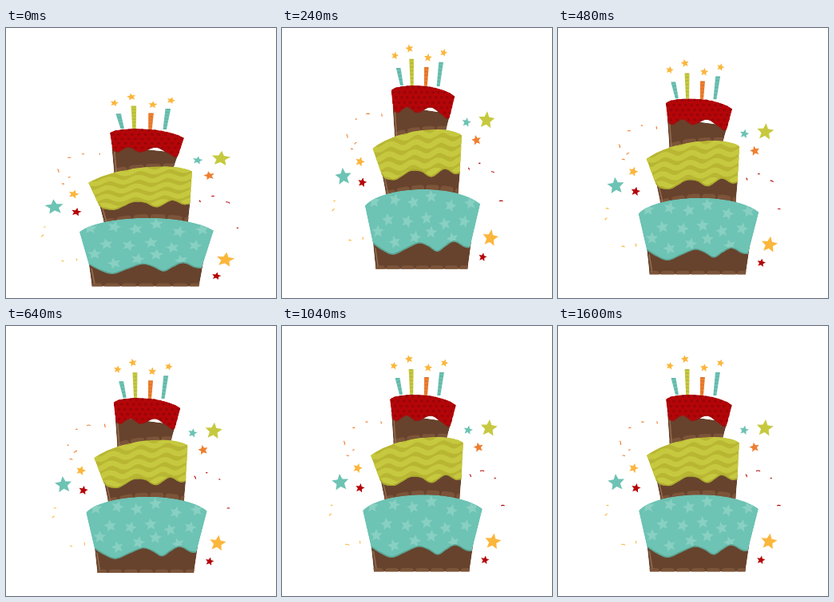
Recreate the animation shown at these times as an HTML page. Size 338x338 px, loop 1.92 s.

```html
<!DOCTYPE html>
<html lang="en">
<head>
<meta charset="utf-8">
<title>Birthday cake</title>
<style>
html, body { margin: 0; width: 100%; height: 100%; overflow: hidden; background: #fff; }
svg { display: block; width: 100vw; height: 100vh; }
</style>
</head>
<body>
<svg viewBox="0 0 338 338"><defs id="defs"></defs><g id="cake"></g></svg>
<script>
const NS = 'http://www.w3.org/2000/svg';
const cake = document.getElementById('cake');
const defs = document.getElementById('defs');

const TEAL = '#6dc3b4', LIME = '#c6c93f', ORANGE = '#ee7f30';
const GOLD = '#fbb63c', RED = '#b40508', BROWN = '#67432d', COCOA = '#7c5439';

function add(parent, tag, attrs) {
  const el = document.createElementNS(NS, tag);
  for (const k in attrs) el.setAttribute(k, attrs[k]);
  parent.appendChild(el);
  return el;
}

const path = (parent, d, fill, more) => add(parent, 'path', { d, fill, ...more });
const line = (parent, d, stroke, width, more) =>
  path(parent, d, 'none', { stroke, 'stroke-width': width, ...more });

function star(parent, x, y, r, fill, turn = 0) {
  let pts = '';
  for (let i = 0; i < 10; i++) {
    const a = turn + i * Math.PI / 5 - Math.PI / 2;
    const q = i % 2 ? r * 0.46 : r;
    pts += `${(x + q * Math.cos(a)).toFixed(2)},${(y + q * Math.sin(a)).toFixed(2)} `;
  }
  add(parent, 'polygon', { points: pts, fill });
}

// Smooth curve through points, continuing from the first one.
function curve(p) {
  let d = '';
  for (let i = 0; i < p.length - 1; i++) {
    const a = p[i - 1] || p[i], b = p[i], c = p[i + 1], e = p[i + 2] || c;
    d += `C${b[0] + (c[0] - a[0]) / 6},${b[1] + (c[1] - a[1]) / 6} ` +
         `${c[0] - (e[0] - b[0]) / 6},${c[1] - (e[1] - b[1]) / 6} ${c[0]},${c[1]}`;
  }
  return d;
}

function clipped(id, d) {
  path(add(defs, 'clipPath', { id }), d);
  return add(cake, 'g', { 'clip-path': `url(#${id})` });
}

function tier({ id, sponge, base, edge, top, drip, fill, rim, pattern }) {
  const body = clipped(id + 'Sponge', sponge);
  path(body, sponge, BROWN);
  line(body, base, COCOA, 8, { 'stroke-dasharray': '9 10', 'stroke-linecap': 'round' });
  line(body, edge, '#936a4d', 1.6);
  const start = drip[0];
  const icing = `${top}L${start}${curve(drip)}Z`;
  const g = clipped(id + 'Icing', icing);
  path(g, icing, fill);
  pattern(g);
  line(g, `M${start}${curve(drip)}`, rim, 3);
}

tier({
  id: 'red', fill: RED, rim: '#9c1410',
  sponge: 'M137,110L212,120L206,141L203,152H140Z',
  base: 'M142,146Q165,138 207,139',
  edge: 'M140,118L142.5,150',
  top: 'M135,92C140,84 195,82 218,99',
  drip: [[211, 125], [207, 126], [199, 120], [186, 112.5], [169, 119], [156, 112.5], [144, 119], [138, 116]],
  pattern(g) {
    for (let j = 0; j < 7; j++)
      for (let i = 0; i < 13; i++)
        add(g, 'circle', { cx: 134 + i * 7.4 + (j % 2) * 3.7, cy: 88 + j * 6.2, r: 1.8, fill: '#980609' });
  }
});

tier({
  id: 'lime', fill: '#b8b632', rim: '#aaa62f',
  sponge: 'M122,186H225L222,220H129Z',
  base: 'M128,218Q175,204 222,214',
  edge: 'M126.5,196L131.5,218',
  top: 'M111,162C140,140 205,132 227,146',
  drip: [[224.5, 192], [217, 192.5], [204, 187], [188, 196.5], [174, 190], [161, 189], [150, 195], [140, 200], [128, 198.5], [122.5, 193]],
  pattern(g) {
    for (let j = 0; j < 6; j++) {
      const pts = [];
      for (let x = 105; x <= 235; x += 5)
        pts.push([x, 145 + j * 12 - (x - 170) * 0.07 + 3 * Math.sin((x - 112 + j * 2) / 5.2)]);
      line(g, `M${pts[0]}${curve(pts)}`, LIME, 6.6);
    }
  }
});

tier({
  id: 'teal', fill: TEAL, rim: '#5ca18f',
  sponge: 'M111,270H240L234.5,307.5H115Z',
  base: 'M114,307H236',
  edge: 'M114.5,282L118,304',
  top: 'M101,231C125,206 220,204 251,229',
  drip: [[237.5, 282], [230, 281], [217, 274.5], [206, 280], [195, 286.5], [183, 280], [171, 276.5], [155, 283], [138, 290], [124, 285], [111.5, 277]],
  pattern(g) {
    [[113, 226], [140, 224], [164, 227], [187, 220], [212, 231], [238, 228],
     [131, 248], [156, 250], [181, 246], [205, 253], [230, 250],
     [118, 262], [140, 275], [166, 269], [187, 263], [215, 271]]
      .forEach(([x, y], i) => star(g, x, y, 8.2, '#87d0c2', 0.3 * Math.sin(i * 2)));
  }
});

// Candles: top centre, base centre, colour.
[[144.5, 65, 149, 86, TEAL], [161.6, 54, 162.2, 86, LIME],
 [181, 64, 180, 87, ORANGE], [200, 58, 196.3, 87, TEAL]].forEach(([x, y, bx, by, c]) => {
  path(cake, `M${x - 3},${y}L${x + 3},${y}L${bx + 2},${by}L${bx - 2},${by}Z`, c);
  line(cake, `M${x},${y}L${bx},${by}`, '#00000018', 4, { 'stroke-dasharray': '1.5 3' });
});

[[140, 50, 5, GOLD, 0.2], [159, 41.5, 5.3, GOLD, -0.2], [183, 52.5, 5.3, GOLD, 0.1], [203.3, 46.5, 5, GOLD, 0.3],
 [73, 196, 11, TEAL, -0.1], [97.6, 203, 6, RED, 0.2], [94.6, 178, 6.3, GOLD, 0.3],
 [259, 128, 11, LIME, 0.1], [233, 130.5, 6, TEAL, 0.2], [246, 152, 6.4, ORANGE, -0.2],
 [264, 270, 10.6, GOLD, 0.15], [254, 293, 5.5, RED, 0.2]].forEach(a => star(cake, ...a));

// Slivers of ribbon: x, y, colour, direction in degrees.
const slivers = [[90, 127, ORANGE, 0], [105, 121, ORANGE, 0], [123, 122, ORANGE, 80], [78, 146, ORANGE, 75],
  [89, 155, ORANGE, -35], [83, 163, ORANGE, 10], [62, 225, GOLD, 0], [60, 237, GOLD, -45],
  [82, 273, GOLD, 10], [98, 270, GOLD, 80], [235, 187, RED, 65], [250, 181, RED, 0],
  [267, 190, RED, 20], [277, 225, RED, 0]].map(([x, y, c, deg]) => ({
    x, y, deg, el: line(cake, '', c, 1.1)
  }));

const rand = n => { const v = Math.sin(n * 12.9898) * 43758.5453; return v - Math.floor(v); };

function scatter(step) {
  slivers.forEach((s, i) => {
    const n = i * 31 + step * 7 + 3;
    const half = 0.8 + 1.8 * rand(n);
    const x = s.x + 2 * (rand(n + 1) - 0.5), y = s.y + 2 * (rand(n + 2) - 0.5);
    s.el.setAttribute('d', `M${-half},0Q0,-1.2 ${half},0`);
    s.el.setAttribute('transform', `translate(${x} ${y}) rotate(${s.deg})`);
  });
}

const LOOP = 1920;
const steps = [0, 80, 160, 240, 320, 400, 480, 560, 640, 720, 800, 960, 1040, 1360, 1600];
const elastic = t => 1 - 2 ** (-t / 200) * Math.cos(2 * Math.PI * t / 600);

let shown = -1;
function draw(now) {
  const t = now % LOOP;
  let k = steps.length - 1;
  while (steps[k] > t) k--;
  if (k !== shown) {
    shown = k;
    const p = elastic(steps[k]);
    const sy = 0.892 + 0.108 * p;
    cake.setAttribute('transform',
      `translate(176.3 ${126 - 40 * p}) scale(${1 / sy} ${sy}) translate(-176.3 -86)`);
    scatter(Math.min(k, 12));
  }
}

const begin = performance.now();
function tick() {
  draw(performance.now() - begin);
  requestAnimationFrame(tick);
}
tick();
</script>
</body>
</html>
```
